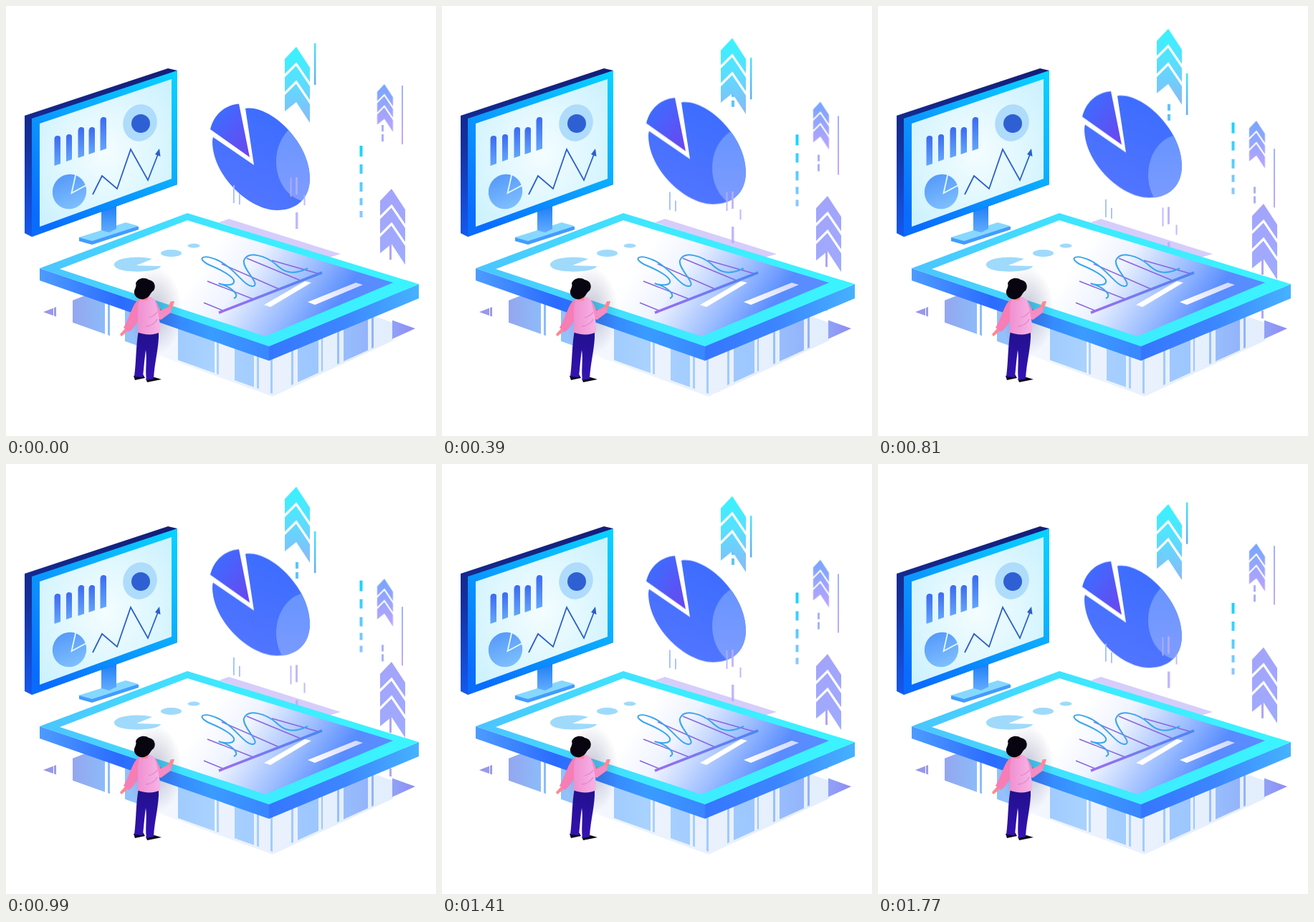
These frames come from a looping animation (600 by 600 pixels, 1800 ms). An HTML page:

```html
<!DOCTYPE html>
<html lang="en">
<head>
<meta charset="utf-8">
<title>Data dashboard</title>
<style>
  html, body { margin: 0; width: 100%; height: 100%; overflow: hidden; background: #fff; }
  svg { display: block; width: 100vw; height: 100vh; }
  /* each moving part drifts by --a and back */
  .m { animation: drift 1800ms infinite; }
  @keyframes drift {
    0%, 100% { transform: translateY(0); animation-timing-function: steps(30, end); }
    50% { transform: translateY(var(--a)); animation-timing-function: steps(30, end); }
  }
</style>
</head>
<body>
<svg viewBox="0 0 600 600">
  <defs>
    <linearGradient id="arrowCyan" x2="0" y2="1"><stop stop-color="#35f4ff"/><stop offset=".4" stop-color="#55e2ff"/><stop offset="1" stop-color="#8cb8f8"/></linearGradient>
    <linearGradient id="arrowMix" x2="0" y2="1"><stop stop-color="#76a6ff"/><stop offset="1" stop-color="#bda4fd"/></linearGradient>
    <linearGradient id="arrowLilac" x2="0" y2="1"><stop stop-color="#a3a4fb"/><stop offset="1" stop-color="#9fabff"/></linearGradient>
    <linearGradient id="lineCyan" x2="0" y2="1"><stop stop-color="#42e4fa"/><stop offset="1" stop-color="#62a9f5"/></linearGradient>
    <linearGradient id="lineLilac" x2="0" y2="1"><stop stop-color="#9cb4ff"/><stop offset="1" stop-color="#c2a6fb"/></linearGradient>
    <linearGradient id="dashes" gradientUnits="userSpaceOnUse" x1="0" y1="195" x2="0" y2="295"><stop stop-color="#12d4ff"/><stop offset="1" stop-color="#8ec6ff"/></linearGradient>
    <linearGradient id="pie" x1=".7" y1="0" x2=".3" y2="1"><stop stop-color="#3b6cff"/><stop offset="1" stop-color="#5376ff"/></linearGradient>
    <linearGradient id="slice" x2="1" y2="1"><stop offset=".2" stop-color="#3f6bff"/><stop offset="1" stop-color="#6c45ee"/></linearGradient>
    <linearGradient id="lens" x2="0" y2="1"><stop stop-color="#6795ff"/><stop offset="1" stop-color="#7f9cff"/></linearGradient>
    <linearGradient id="back" x2="0" y2="1"><stop stop-color="#151e78"/><stop offset=".45" stop-color="#14309c"/><stop offset="1" stop-color="#1559ef"/></linearGradient>
    <linearGradient id="bezel" x1="1" y1="0" x2=".2" y2="1"><stop stop-color="#08d4ff"/><stop offset=".5" stop-color="#0aa6ff"/><stop offset="1" stop-color="#086cff"/></linearGradient>
    <radialGradient id="glass" cx=".5" cy=".5" r=".65"><stop stop-color="#f4fdff"/><stop offset="1" stop-color="#cdf2fe"/></radialGradient>
    <linearGradient id="stand" x2="0" y2="1"><stop stop-color="#1c7cf4"/><stop offset="1" stop-color="#63acff"/></linearGradient>
    <linearGradient id="bar" x2="0" y2="1"><stop stop-color="#3c6af0"/><stop offset="1" stop-color="#63a6fa"/></linearGradient>
    <linearGradient id="miniPie" x2="1" y2="1"><stop stop-color="#4f93fa"/><stop offset="1" stop-color="#86c6fe"/></linearGradient>
    <linearGradient id="frame" x2="1"><stop stop-color="#4bc4ff"/><stop offset=".5" stop-color="#3deaff"/><stop offset="1" stop-color="#3bf4ff"/></linearGradient>
    <linearGradient id="sideL" x2="1"><stop stop-color="#4d9cff"/><stop offset=".35" stop-color="#2b6bff"/><stop offset=".75" stop-color="#3a9cff"/><stop offset="1" stop-color="#3a86ff"/></linearGradient>
    <linearGradient id="sideR" x2="1"><stop stop-color="#3576ff"/><stop offset=".5" stop-color="#3d86ff"/><stop offset="1" stop-color="#46b2ff"/></linearGradient>
    <linearGradient id="panel" gradientUnits="userSpaceOnUse" x1="285" y1="345" x2="440" y2="450"><stop stop-color="#fff"/><stop offset=".3" stop-color="#eef3ff"/><stop offset=".7" stop-color="#9bbcff"/><stop offset="1" stop-color="#588cff"/></linearGradient>
    <linearGradient id="axis" gradientUnits="userSpaceOnUse" x1="297" y1="0" x2="441" y2="0"><stop stop-color="#9c6cf0"/><stop offset="1" stop-color="#4b86f5"/></linearGradient>
    <linearGradient id="slot" x2="1"><stop stop-color="#fff"/><stop offset="1" stop-color="#cfd6ff"/></linearGradient>
    <linearGradient id="slab" x2="1"><stop stop-color="#fff"/><stop offset=".3" stop-color="#eef3fd"/><stop offset="1" stop-color="#e3eefd"/></linearGradient>
    <linearGradient id="post" gradientUnits="userSpaceOnUse" x1="52" y1="0" x2="571" y2="0"><stop stop-color="#9b93e6"/><stop offset=".17" stop-color="#8cbcfa"/><stop offset=".45" stop-color="#a9d2ff"/><stop offset=".75" stop-color="#9cc6ff"/><stop offset=".9" stop-color="#92b0fa"/><stop offset="1" stop-color="#8e8cf2"/></linearGradient>
    <radialGradient id="shade"><stop stop-color="#3a3f78" stop-opacity=".32"/><stop offset="1" stop-color="#3a3f78" stop-opacity="0"/></radialGradient>
    <linearGradient id="shirt" x2="1"><stop stop-color="#f08fd0"/><stop offset="1" stop-color="#f6b4e6"/></linearGradient>
    <linearGradient id="trousers" x2="0" y2="1"><stop stop-color="#21108c"/><stop offset="1" stop-color="#3512b4"/></linearGradient>

    <g id="arrow">
      <path d="M0 0L19 29V106L0 77L-16 90V17Z"/>
      <path id="gap" d="M-18 42L0 24L21 55M-18 67L0 49L21 80" fill="none" stroke="#fff" stroke-width="3.2"/>
    </g>
    <path id="disc" d="M346 222L334 143A0 0 0 0 1 334 143C368 137 424 190 424 240C424 270 404 285 378 285C340 285 288 237 288 189Q288 186 289 183Z"/>
    <clipPath id="inPie"><use href="#disc"/></clipPath>
    <clipPath id="onSlab"><path d="M52 429L270 345L571 453L372 545Z"/></clipPath>
    <clipPath id="onPosts"><path d="M52 427L270 341L571 450L372 541Z"/></clipPath>
  </defs>

  <!-- slab under the tablet -->
  <path d="M150 440L160 400H540V467L372 545L150 465Z" fill="url(#slab)" clip-path="url(#onSlab)"/>
  <g clip-path="url(#onPosts)" fill="url(#post)">
    <path d="M52 400h14v80H52zM67 400h3v80h-3zM93 400h45v100H93zM142 400h3v100h-3zM166 400h20v100h-20zM240 430h51v100h-51zM294 430h3v120h-3zM319 430h27v120h-27zM350 430h3v120h-3zM369 430h3v120h-3zM398 430h3v120h-3zM407 430h29v120h-29zM440 430h2v120h-2zM462 430h3v120h-3zM471 430h34v120h-34zM510 430h3v120h-3zM539 400h32v120h-32z"/>
  </g>

  <path d="M297 302L311 297L467 346L450 351Z" fill="#d6cdfb"/>

  <!-- pie -->
  <g class="m" style="--a:-19.5px">
    <use href="#disc" fill="url(#pie)"/>
    <g clip-path="url(#inPie)">
      <ellipse class="m" style="--a:40px" cx="422" cy="217" rx="45" ry="56" fill="url(#lens)"/>
    </g>
    <path d="M340 211L325 136.500C306 138 290 151 285 172Z" fill="url(#slice)"/>
  </g>
  <g fill="#a4bdfa">
    <g class="m" style="--a:22px">
      <rect x="317" y="250" width="1.800" height="25"/>
      <rect x="325" y="262" width="1.800" height="15"/>
    </g>
    <g class="m" style="--a:46px" fill="#b6adfd" fill-opacity=".85">
      <rect x="396.500" y="240" width="2" height="26"/>
      <rect x="404" y="239" width="3" height="24"/>
      <rect x="404" y="288" width="3.500" height="23"/>
      <rect x="415.500" y="264" width="2" height="14"/>
    </g>
  </g>

  <!-- dashes and arrows -->
  <g class="m" style="--a:41px" fill="#5cc4fb">
    <path d="M404 100h4v9h-4zM404 114h4v9h-4z"/>
  </g>
  <g class="m" style="--a:-28px"><use href="#arrow" x="405" y="57" fill="url(#arrowCyan)"/></g>
  <rect class="m" style="--a:46.700px" x="430" y="52" width="2.400" height="58" fill="url(#lineCyan)"/>

  <g class="m" style="--a:96px" fill="#a9b0fd">
    <path d="M524 166h3v9h-3zM524 179h3v10h-3z"/>
  </g>
  <g class="m" style="--a:56.700px">
    <use href="#arrow" transform="translate(528 109) scale(.63)" fill="url(#arrowMix)"/>
  </g>
  <rect class="m" style="--a:98px" x="552" y="111" width="2" height="82" fill="url(#lineLilac)"/>

  <path class="m" style="--a:-36px" fill="url(#dashes)" d="M493.500 195h4v15h-4zM493.500 221h4v13h-4zM493.500 246h4v13h-4zM493.500 268h4v10h-4zM493.500 286h4v9h-4z"/>

  <g class="m" style="--a:23.300px" fill="#b0a4fb">
    <path d="M535 332h3v22h-3zM535 404h3v11h-3z"/>
    <use href="#arrow" x="538" y="255" fill="url(#arrowLilac)"/>
  </g>

  <!-- monitor -->
  <path d="M102 323L167 303L185 308V312L120 333L102 328Z" fill="#429cff"/>
  <path d="M102 323L167 302L185 307L120 328Z" fill="#86d8ff"/>
  <path d="M133 284L154 277V311L144 316L133 313Z" fill="url(#stand)"/>
  <path d="M26 153L226 87L239 90V249L36 322L26 317Z" fill="url(#back)"/>
  <path d="M36 157L239 90V249L36 322Z" fill="url(#bezel)"/>
  <path d="M47 164L231 102V241L47 308Z" fill="url(#glass)"/>
  <g fill="url(#bar)">
    <path d="M67.500 223V185Q68 181 72 181T76 184V220Z"/>
    <path d="M84 217V183Q84 179 88 179T92 182V214Z"/>
    <path d="M100.500 212V174Q101 169 105 169T109 172V209Z"/>
    <path d="M115.500 207V174Q116 169 120 169T124 172V204Z"/>
    <path d="M131.500 202V160Q132 155 136 155T140 158V199Z"/>
  </g>
  <ellipse cx="187" cy="163" rx="23.500" ry="26" transform="rotate(20 187 163)" fill="#afdcfb"/>
  <circle cx="188" cy="164" r="13" fill="#2e60d4"/>
  <ellipse cx="88.500" cy="259" rx="23.500" ry="24.500" transform="rotate(25 88.500 259)" fill="url(#miniPie)"/>
  <path d="M98 232L91.500 261L114 249" fill="none" stroke="#e6faff" stroke-width="1.800"/>
  <path d="M121 263L134 237L155 255L174 200L198 243L212 207" fill="none" stroke="#2b5fcb" stroke-width="1.800"/>
  <path d="M214 199L215.500 210L208 207Z" fill="#2b5fcb"/>

  <!-- tablet -->
  <path d="M47 366L367 474V495L47 383Z" fill="url(#sideL)"/>
  <path d="M367 474L576 388V408L367 495Z" fill="url(#sideR)"/>
  <path d="M47 366L253 289L576 388L367 475Z" fill="url(#frame)"/>
  <path d="M75 367L253 299L540 386L362 461Z" fill="url(#panel)"/>
  <g fill="#9fdafb">
    <path d="M182 362L204 353C190 348 151 350 151 361C151 374 212 373 216 363Z"/>
    <ellipse cx="230.500" cy="345" rx="14.500" ry="5"/>
    <ellipse cx="262" cy="334.500" rx="8.500" ry="3"/>
  </g>
  <g fill="none" stroke-width="1.500">
    <path d="M276 414L303 425M281 384L345 409M301 360L381 395M336 352L411 383M371 355L438 374" stroke="#8a64dc"/>
    <path d="M318 408C328 404 314 392 299 388C293 385 306 392 316 388C326 381 300 368 283 361C264 351 276 346 296 355C320 366 332 392 345 391C356 388 329 367 332 355C338 340 364 350 376 360C388 372 400 376 421 366" stroke="#3aa6ec" stroke-width="2"/>
    <path d="M297 428L441 372" stroke="url(#axis)" stroke-width="3.500"/>
  </g>
  <path d="M360 417L417 384L426 386L369 420Z" fill="#fff"/>
  <path d="M421 413L488 386L498 389L431 417Z" fill="url(#slot)"/>

  <!-- visitor -->
  <ellipse cx="208" cy="426" rx="38" ry="62" fill="url(#shade)"/>
  <path d="M178 516L191 514L194 519L180 522ZM195 520L207 518L217 521L197 525Z" fill="#0b0718"/>
  <path d="M185 453L213 455C214 474 207 498 206 520L196 522C194 508 197 494 195 480C193 495 192 508 191 518L179 517C182 494 181 474 185 453Z" fill="url(#trousers)"/>
  <path d="M168 448L159 458L161 461L172 452ZM213 426L226 420L230 412L235 412L231 424L216 433Z" fill="#ff8794"/>
  <path d="M188 408C177 412 174 432 164 449L172 455C180 447 187 437 190 427Z" fill="#f77db6"/>
  <path d="M202 407C211 410 213 421 216 426L229 420L231 427L216 438L207 433Z" fill="#f58cc6"/>
  <path d="M187 408C193 403 204 404 208 411C211 424 216 440 215 455C206 460 193 459 183 455C186 438 181 422 187 408Z" fill="url(#shirt)"/>
  <path d="M195 447Q206 446 211 437M199 435Q208 432 211 427" fill="none" stroke="#e583cc" stroke-width="1.300"/>
  <path d="M184 402L199 402L198 411L189 411Z" fill="#ff8794"/>
  <path d="M181 387C184 379 194 378 199 382C207 383 210 391 206 397C201 400 201 406 195 408C188 412 179 406 179 400C178 396 183 392 181 387Z" fill="#080510"/>
</svg>
</body>
</html>
```
